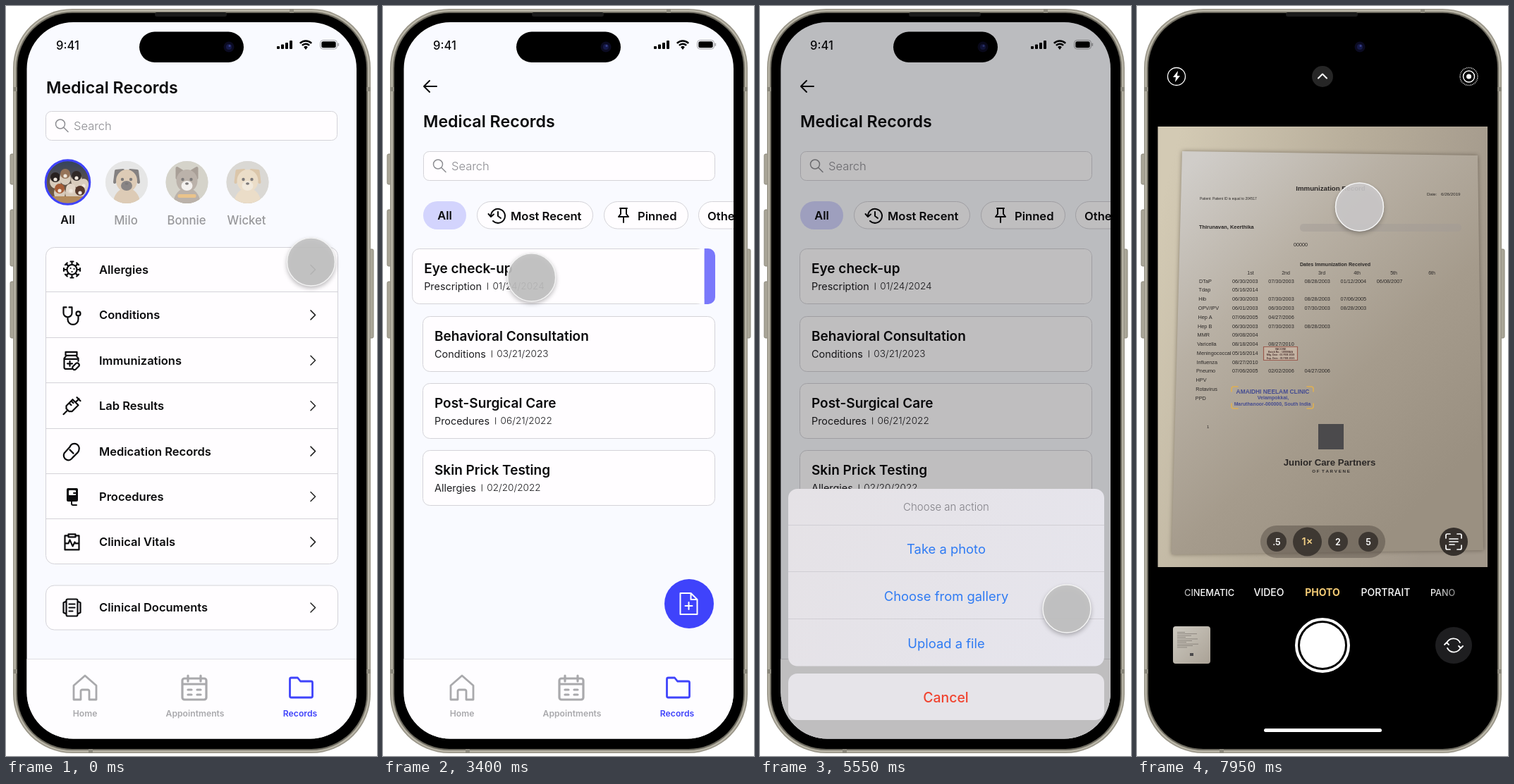
Write an HTML page with a canvas that moves like this. It is 526x1064 px and loops after 8000 ms.

```html
<!DOCTYPE html>
<html lang="en">
<head>
<meta charset="utf-8">
<title>Pet records app</title>
<style>
html, body { margin: 0; width: 100%; height: 100%; overflow: hidden; background: #fff; }
canvas { display: block; width: 526px; height: 1064px; }
</style>
</head>
<body>
<canvas></canvas>
<script>
const W = 526, H = 1064, LOOP = 8000, dpr = window.devicePixelRatio || 1;
const BLUE = '#3f43fb', INK = '#0b0b0d', GRAY = '#a9a9ac', LINE = '#d4d3d8', BG = '#f9faff', CARD = '#fffdff';

function prepare(canvas) {
  canvas.width = W * dpr;
  canvas.height = H * dpr;
  const ctx = canvas.getContext('2d');
  ctx.scale(dpr, dpr);
  return ctx;
}
let g = prepare(document.querySelector('canvas'));
const layer = prepare(document.createElement('canvas'));

// ---- drawing helpers ----
function paint(fill, stroke, lw = 1) {
  if (fill) { g.fillStyle = fill; g.fill(); }
  if (stroke) { g.strokeStyle = stroke; g.lineWidth = lw; g.stroke(); }
}
function box(x, y, w, h, r, fill, stroke, lw) {
  g.beginPath();
  g.roundRect(x, y, w, h, r);
  paint(fill, stroke, lw);
}
function disc(x, y, r, fill, stroke, lw, ry = r) {
  g.beginPath();
  g.ellipse(x, y, r, ry, 0, 0, 7);
  paint(fill, stroke, lw);
}
// y is the middle of the capital letters
function text(s, x, y, size, weight = 400, color = INK, align = 'left', font = 'Inter') {
  g.font = `${weight} ${size}px ${font}, sans-serif`;
  g.textAlign = align;
  g.fillStyle = color;
  g.fillText(s, x, y + size * 0.363);
  return g.measureText(s).width;
}
function icon(d, x, y, color = INK, lw = 2, fill) {
  const p = new Path2D(d);
  g.save();
  g.translate(x, y);
  g.lineCap = g.lineJoin = 'round';
  if (fill) { g.fillStyle = fill; g.fill(p); }
  if (lw) { g.strokeStyle = color; g.lineWidth = lw; g.stroke(p); }
  g.restore();
}
function clipped(shape, draw) {
  g.save();
  g.beginPath();
  shape();
  g.clip();
  draw();
  g.restore();
}
function gradient(x0, y0, x1, y1, ...stops) {
  const gr = g.createLinearGradient(x0, y0, x1, y1);
  stops.forEach((s, i) => gr.addColorStop(i / (stops.length - 1), s));
  return gr;
}
function fadeIn(draw, alpha) {
  const main = g;
  g = layer;
  g.clearRect(0, 0, W, H);
  draw();
  g = main;
  g.globalAlpha = alpha;
  g.drawImage(layer.canvas, 0, 0, W, H);
  g.globalAlpha = 1;
}

// ---- time ----
const ease = t => t < 0.5 ? 4 * t ** 3 : 1 - 4 * (1 - t) ** 3;
const ramp = (t, a, b) => Math.min(1, Math.max(0, (t - a) / (b - a)));
const eased = (t, a, b) => ease(ramp(t, a, b));

// cursor moves: from, to, x, y
const moves = [
  [0, 450, 389, 374], [800, 1100, 389, 385], [1500, 2500, 39.5, 384], [2500, 3700, 222, 385],
  [3800, 4495, 435, 855], [5700, 6100, 366, 756], [7050, 7920, 315.5, 285]
];
function cursor(t) {
  let x = 432.5, y = 363;
  for (const [a, b, nx, ny] of moves) {
    const p = eased(t, a, b);
    x += (nx - x) * p;
    y += (ny - y) * p;
  }
  g.save();
  g.shadowColor = 'rgba(0,0,0,.3)';
  g.shadowBlur = 6 * dpr;
  g.shadowOffsetY = 3 * dpr;
  disc(x, y, 34.5, t >= 7950 ? 'rgba(208,205,207,.88)' : 'rgba(195,195,195,.9)');
  g.restore();
  disc(x, y, 34, null, '#f4f4f4', 1.5);
}

// ---- phone ----
function phone() {
  g.fillStyle = '#fff';
  g.fillRect(0, 0, W, H);
  for (const [x, y, h] of [[6, 210, 43], [6, 289, 80], [6, 391, 80], [514, 345, 126]])
    box(x, y, 7, h, 2, '#aaa698', '#8a877a');
  box(10, 4, 507, 1056, 84, '#989487');
  box(11.5, 5.5, 504, 1053, 82.5, '#b9b5a7');
  box(14, 8, 499, 1048, 80, '#6f6c61');
  g.fillStyle = '#8b887c';
  for (const y of [115, 941]) { g.fillRect(10, y, 6, 6); g.fillRect(511, y, 6, 6); }
  g.fillRect(402, 4, 6, 6);
  g.fillRect(117, 1054, 6, 6);
  box(16, 10, 495, 1044, 78, '#000');
  box(211, 9, 102, 6, 3, '#1b1b1b');
}
function lens() {
  disc(316, 58, 7.5, '#0b0b22');
  disc(316, 58, 4, '#161a4a');
  disc(317, 56.5, 1.5, '#39418c');
}
function statusBar() {
  text('9:41', 71, 55.5, 16.6, 500);
  [4, 6.5, 9, 12].forEach((h, i) => box(384 + i * 6, 61 - h, 4, h, 1, '#000'));
  for (const r of [11.5, 7.2]) {
    g.beginPath();
    g.arc(425, 61, r, -2.36, -0.78);
    paint(null, '#000', 2.6);
  }
  g.beginPath();
  g.moveTo(425, 62);
  g.arc(425, 61, 4, -2.36, -0.78);
  paint('#000');
  box(445.5, 48.5, 24, 12.5, 4, null, '#a5a5a8');
  box(447.3, 50.3, 20.4, 9, 2.5, '#000');
  box(470.5, 52.5, 1.6, 4.5, 1, '#a5a5a8');
  box(189, 36.5, 148, 43.5, 21.7, '#000');
  lens();
}
function page() {
  g.fillStyle = BG;
  g.fillRect(29, 23, 469, 1018);
  statusBar();
}
const FOLDER = 'M-16 -12a2 2 0 0 1 2 -2h9l4 5h15a2 2 0 0 1 2 2v19a2 2 0 0 1 -2 2h-28a2 2 0 0 1 -2 -2z';
function tabs() {
  g.fillStyle = '#fefdff';
  g.fillRect(29, 927, 469, 114);
  g.fillStyle = '#dfdfe4';
  g.fillRect(29, 926, 469, 1);
  icon('M-16 -3L0 -17L16 -3V17H6V5a2 2 0 0 0 -2 -2h-8a2 2 0 0 0 -2 2V17H-16z', 112, 967, GRAY, 2.8);
  icon('M-14 -13h28a3 3 0 0 1 3 3v24a3 3 0 0 1 -3 3h-28a3 3 0 0 1 -3 -3v-24a3 3 0 0 1 3 -3zM-9 -17v8M9 -17v8M-17 -5h34M-9 3h5M4 3h5M-9 10h5M4 10h5', 267, 967, GRAY, 3.2);
  icon(FOLDER, 418.5, 967, BLUE, 2.8);
  text('Home', 112, 1004, 12.2, 600, GRAY, 'center');
  text('Appointments', 268, 1004, 12.2, 600, GRAY, 'center');
  text('Records', 417, 1004, 12.2, 600, BLUE, 'center');
}
function search(x, y) {
  box(x + .5, y + .5, 413, 41, 8, CARD, LINE);
  icon('M6.5 0a6.5 6.5 0 1 1 -13 0a6.5 6.5 0 1 1 13 0M5 5l6 6', x + 21, y + 18.5, '#8e8e93', 1.5);
  text('Search', x + 40, y + 21, 16.5, 300, '#8b8b90');
}

// ---- category menu ----
let virus = 'M7 0a7 7 0 1 1 -14 0a7 7 0 1 1 14 0M-2 -2h.1M3 -1h.1M0 3h.1';
for (let i = 0; i < 8; i++) {
  const c = Math.cos(i * Math.PI / 4), s = Math.sin(i * Math.PI / 4);
  virus += `M${7 * c} ${7 * s}L${11.5 * c} ${11.5 * s}M${11.5 * c - 2 * s} ${11.5 * s + 2 * c}L${11.5 * c + 2 * s} ${11.5 * s - 2 * c}`;
}
const rows = [
  ['Allergies', virus],
  ['Conditions', 'M-8 -11h-4v8a6 6 0 0 0 12 0v-8h-4M-6 3v3a7 7 0 0 0 15 0v-5M12 -2a3 3 0 1 1 -6 0a3 3 0 1 1 6 0'],
  ['Immunizations', 'M-9 -12h16v5h-16zM-8 -7l-3 4v13a2 2 0 0 0 2 2h9M6 -7l3 4v4M-11 -2h18M-3 1v7M-6.5 4.5h7M1 9l5 -5a3 3 0 0 1 4 4l-5 5a3 3 0 0 1 -4 -4'],
  ['Lab Results', 'M-12 12l6 -6M-6 6l-2 -2v-4l9 -9l8 8l-9 9h-4zM5 -5l5 -5M7 -12l5 5M-1 -7l3 3M-4 -4l3 3'],
  ['Medication Records', 'M-11 3l8 -9a6.5 6.5 0 0 1 13 4q0 2 -2 4l-7 7a6.5 6.5 0 0 1 -12 -6zM-3 -2l5 5'],
  ['Procedures', ''],
  ['Clinical Vitals', 'M-5 -9h-5v20h20v-20h-5M-5 -11h10v4h-10zM-9 2h4l2 -5l4 9l3 -6l1 2h4']
];
const DOCS = 'M-6 -12h12a2 2 0 0 1 2 2v20a2 2 0 0 1 -2 2h-12a2 2 0 0 1 -2 -2v-20a2 2 0 0 1 2 -2zM-4 -5h8M-4 0h8M-4 5h5M-8 -9l-4 2v14l4 2M8 -9l4 2v14l-4 2';
function row(label, d, y) {
  if (d) icon(d, 93.5, y, INK, 2.2);
  else {
    box(86, y - 12, 16, 19, 2, INK);
    box(89, y - 9, 10, 7, 1, '#fff');
    icon('M93 7v3a2 2 0 0 0 2 2h5M96 -5h3', 0, y, INK, 2);
  }
  text(label, 132, y, 16.5, 600);
  icon('M-3 -6.5l6.5 6.5l-6.5 6.5', 435, y, '#222', 1.5);
}
const FLOPPY = 'M-15 -14l10 -1l-12 17zM15 -14l-10 -1l12 17z', UPRIGHT = 'M-14 -18l10 6l-10 8zM14 -18l-10 6l10 8z';
function pet(x, bg, fur, ear, muzzle, ears, collar) {
  clipped(() => g.arc(x, 250, 30, 0, 7), () => {
    disc(x, 250, 31, bg);
    disc(x, 280, 19, fur, null, 0, 22);
    if (collar) box(x - 13, 267, 26, 5, 2, collar);
    icon(ears, x, 248, ear, 4, ear);
    disc(x, 248, 15, fur, null, 0, 16);
    disc(x, 255, 8, muzzle, null, 0, 7);
    for (const s of [-6, 6]) disc(x + s, 246, 2.2, '#221d1a');
    disc(x, 252, 2.5, '#221d1a', null, 0, 1.8);
    disc(x, 250, 31, 'rgba(249,250,255,.42)');
  });
}
function pack() {
  clipped(() => g.arc(87.5, 250, 31, 0, 7), () => {
    g.fillStyle = gradient(0, 219, 0, 281, '#33435f', '#5d5148', '#84623f');
    g.fillRect(56, 218, 64, 64);
    for (const [x, y, c] of [[70, 243, '#28211f'], [84, 238, '#96745a'], [100, 241, '#302927'], [110, 252, '#d9cdbf'], [76, 259, '#a55c36'], [92, 259, '#e2d6c8'], [105, 262, '#54372a']]) {
      disc(x, y + 6, 8, '#d8cbbb', null, 0, 10);
      disc(x, y, 7, c);
      disc(x, y + 3, 2.6, '#efe7dd');
    }
    box(60, 270, 55, 14, 4, '#b28a5c');
  });
  disc(87.5, 250, 31.3, null, BLUE, 3);
}
function menu() {
  page();
  text('Medical Records', 57, 116, 23.2, 600);
  search(56, 149);
  pack();
  pet(171, '#d7d7d3', '#c7a980', '#2e2926', '#37302c', FLOPPY);
  pet(256.5, '#b9b6a4', '#8d7e6c', '#6d5d4c', '#efe9e2', UPRIGHT, '#dd9a37');
  pet(342.5, '#c2beb4', '#dfc7a0', '#c49f6c', '#eadcc2', FLOPPY);
  text('All', 87.5, 303, 16.2, 600, INK, 'center');
  ['Milo', 'Bonnie', 'Wicket'].forEach((s, i) => text(s, [170, 256, 341][i], 304, 16.7, 500, '#98989b', 'center'));
  box(56.5, 342.5, 414, 449, 12, CARD, LINE);
  rows.forEach(([s, d], i) => {
    const y = 374 + i * 64.4;
    if (i) { g.fillStyle = LINE; g.fillRect(57, Math.round(y - 33), 413, 1); }
    row(s, d, y);
  });
  box(56.5, 822, 414, 63, 12, CARD, LINE);
  row('Clinical Documents', DOCS, 853.5);
  tabs();
}

// ---- record list ----
const records = [
  ['Eye check-up', 'Prescription', '01/24/2024'], ['Behavioral Consultation', 'Conditions', '03/21/2023'],
  ['Post-Surgical Care', 'Procedures', '06/21/2022'], ['Skin Prick Testing', 'Allergies', '02/20/2022']
];
function record([title, kind, date], x, y) {
  box(x + .5, y + .5, 414, 78, 10, CARD, LINE);
  text(title, x + 17, y + 28, 19, 600);
  const w = text(kind, x + 17, y + 53.5, 14.4, 400, '#1d1d20');
  g.fillStyle = '#333';
  g.fillRect(x + 25 + w, y + 48.5, 1, 10);
  text(date, x + 32.5 + w, y + 53.5, 13.6, 300, '#1d1d20');
}
function chip(x, w, label, tx) {
  box(x + .5, 277.5, w, 38.5, 19.5, CARD, LINE);
  text(label, tx, 297.5, 16.6, 600);
}
function list(swipe) {
  page();
  icon('M9 0h-18M-1 -8l-8 8l8 8', 67, 114, INK, 2);
  text('Medical Records', 57, 164, 23.2, 600);
  search(57, 206);
  box(57, 277, 61, 40, 20, '#d3d4fd');
  text('All', 87.5, 297.5, 16.4, 600, INK, 'center');
  chip(133, 164, 'Most Recent', 181);
  icon('M-8.5 1a10 10 0 1 1 3 7M-12 -2l3.5 4l4 -3.5M1.5 -5v6l4 3', 161.5, 297, INK, 2);
  chip(313, 119, 'Pinned', 361);
  icon('M-5 -10h10M-4 -10v8l-3 4h14l-3 -4v-8M0 2v8', 341, 297, INK, 2);
  chip(447, 110, 'Others', 460);
  const dx = -240 * swipe;
  clipped(() => g.roundRect(0, 344, 471, 79, [0, 10, 10, 0]), () => {
    record(records[0], 56 + dx, 344);
    if (!swipe) return;
    const x = 470.5 + dx;
    g.fillStyle = CARD;
    g.fillRect(x - 12, 345, 12, 77);
    ['#7a78fb', '#2f93fb', '#fb3a30'].forEach((c, i) => {
      g.fillStyle = c;
      g.fillRect(x + [0, 81, 161][i], 344, 82, 79);
    });
    icon('M-12 -9a2 2 0 0 1 2 -2h6l3 4h11a2 2 0 0 1 2 2v13a2 2 0 0 1 -2 2h-20a2 2 0 0 1 -2 -2z', x + 38, 384, '#fff', 1.8);
    icon('M-10 0v10a2 2 0 0 0 2 2h16a2 2 0 0 0 2 -2v-10M0 5v-18M-6 -7l6 -6l6 6', x + 121.5, 384, '#fff', 2);
    icon('M-11 -8h22M-8 -8l1 18a2 2 0 0 0 2 2h10a2 2 0 0 0 2 -2l1 -18M-4 -8v-4h8v4M-3 -3v10M3 -3v10', x + 201, 384, '#fff', 2);
  });
  for (let i = 1; i < 4; i++) record(records[i], 56, Math.round(344.4 + i * 95.3));
  disc(434, 848, 35, BLUE);
  icon('M-12 -15h15l9 9v21h-24zM3 -15v9h9M0 -2v10M-5 3h10', 433.5, 848, '#fff', 2);
  tabs();
}
function sheet(p) {
  g.fillStyle = `rgba(0,0,0,${0.25 * p})`;
  g.fillRect(29, 23, 469, 1018);
  g.save();
  g.translate(0, 380 * (1 - p));
  box(40, 685, 448, 251.5, 13, gradient(40, 685, 488, 936, '#e5e2e6', '#e6e5ed'));
  g.fillStyle = '#d0ced4';
  for (const y of [736, 802, 869]) g.fillRect(40, y, 448, 1);
  text('Choose an action', 264, 710.5, 15, 300, '#828187', 'center');
  ['Take a photo', 'Choose from gallery', 'Upload a file'].forEach((s, i) =>
    text(s, 264, 770 + i * 67, 18.4, 400, '#2f7bf3', 'center'));
  box(40, 947, 448, 66, 13, '#e6e4e9');
  text('Cancel', 263.5, 981, 19.4, 500, '#f0432f', 'center');
  g.restore();
}

// ---- new record form ----
function scan() {
  clipped(() => g.roundRect(56, 206, 154, 153, 12), () => {
    g.fillStyle = gradient(56, 206, 210, 359, '#e9eef1', '#d6e0e8', '#bfd0de');
    g.fillRect(56, 206, 154, 153);
    const dark = '#66727f';
    box(83, 208, 121, 11, 0, dark);
    text('CANINE MEDICAL RECORD', 143.5, 213.5, 8.3, 700, '#eef2f5', 'center');
    g.fillStyle = '#9aa8b4';
    for (let y = 226; y < 358; y += 7.5) g.fillRect(59, y, 147, .7);
    for (let i = 0; i < 8; i++) g.fillRect(72 + i * 9, 262, .7, 36);
    for (const x of [59, 110, 158, 206]) g.fillRect(x, 222, .7, 134);
    for (const [x, y, w, h] of [[59, 261, 6, 37], [137, 261, 7, 37], [58, 299, 149, 6], [58, 330, 149, 6]]) box(x, y, w, h, 0, dark);
    [['PROBLEM LIST', 82, 302], ['MEDICATIONS', 131, 302], ['ALLERGIES', 182, 302], ['DATE', 69, 333], ['TREATMENT NOTES', 124, 333], ['MEDIC. SIGN', 188, 333]]
      .forEach(([s, x, y]) => text(s, x, y, 4, 700, '#eef2f5', 'center'));
    for (let i = 0; i < 34; i++) {
      const x = 62 + (i * 47) % 124, y = 224 + Math.floor(i / 2) * 7.6;
      icon('M0 0q2 -4 3 0t3 0t3 -1t4 1t4 -1', x, y, '#77838f', .7);
    }
  });
}
function form() {
  page();
  icon('M-7 -7l14 14M7 -7l-14 14', 69.5, 114, INK, 2);
  text('Add Record', 56, 164, 22.9, 600);
  scan();
  box(228.5, 206.5, 152.5, 151.5, 10, CARD, LINE);
  icon('M-9.5 0h19M0 -9.5v19', 305.5, 276, INK, 2.2);
  text('Add image', 305.5, 311, 16.2, 600, INK, 'center');
  text('File name*', 56, 400.5, 18.2, 600);
  box(56.5, 424.5, 414, 51.5, 10, CARD, LINE);
  text('File Name', 67, 451, 16.5, 300, '#8f8f94');
  text('Date of Record*', 56, 518.5, 18.2, 600);
  box(56.5, 542.5, 414, 51.5, 10, CARD, LINE);
  text('MM/DD/YYYY', 75, 569.5, 13.6, 300, '#8f8f94');
  icon('M-9 -9h18a2 2 0 0 1 2 2v16a2 2 0 0 1 -2 2h-18a2 2 0 0 1 -2 -2v-16a2 2 0 0 1 2 -2zM-11 -2h22M-6 -12v5M6 -12v5', 429, 569, INK, 2.2);
  text('Additional Notes', 56, 637, 18.2, 600);
  box(56.5, 660.5, 414, 96.5, 10, CARD, LINE);
  box(56, 923, 415, 56.5, 10, BLUE);
  text('Save Record', 263.5, 952, 18.6, 600, '#fff', 'center');
}

// ---- camera ----
const doses = `DTaP 06/30/2003 07/30/2003 08/28/2003 01/12/2004 06/08/2007
Tdap 05/16/2014
Hib 06/30/2003 07/30/2003 08/28/2003 07/06/2005
OPV/IPV 06/01/2003 06/30/2003 07/30/2003 08/28/2003
Hep_A 07/06/2005 04/27/2006
Hep_B 06/30/2003 07/30/2003 08/28/2003
MMR 09/08/2004
Varicella 08/18/2004 08/27/2010
Meningococcal 05/16/2014
Influenza 08/27/2010
Pneumo 07/06/2005 02/02/2006 04/27/2006
HPV
Rotavirus
PPD`.split('\n').map(l => l.split(' '));
const print = (s, x, y, size, weight = 400, align = 'left', color = '#2b2827') =>
  text(s, x, y, size, weight, color, align, 'Liberation Sans');

function paper() {
  g.fillStyle = gradient(29, 300, 497, 420, '#d3cab4', '#b8ae9b', '#a1978a');
  g.fillRect(29, 171, 468, 625);
  g.save();
  g.shadowColor = 'rgba(40,30,20,.45)';
  g.shadowBlur = 6 * dpr;
  icon('M64 206L483 212L491 772L49 778z', 0, 0, '', 0, gradient(70, 230, 470, 640, '#d0cdc9', '#b8b0a4', '#a59b8c', '#9a9081'));
  g.restore();
  print('Immunization Record', 274.5, 258, 9.7, 700, 'center');
  print('Patient: Patient ID is equal to 204517', 89, 273.5, 4.9);
  print('Date:', 411, 267, 6);
  print('6/26/2019', 431, 267, 6.2);
  print('Thirunavan, Keerthika', 88, 313.5, 7.4, 700);
  box(231, 309, 229, 11, 5, 'rgba(160,154,148,.45)');
  print('00000', 222, 338, 7.2);
  print('Dates Immunization Received', 281, 366, 7.1, 700, 'center');
  ['1st', '2nd', '3rd', '4th', '5th', '6th'].forEach((s, i) => print(s, [161, 211, 262, 312, 364, 418][i], 378, 7, 400, 'center'));
  doses.forEach(([name, ...dates], i) => {
    const y = 390 + i * 12.78;
    print(name.replace('_', ' '), 88 - i * .4, y, 7.3);
    dates.forEach((d, j) => print(d, 135 + j * 51.2, y, 7.3));
  });
  box(179.5, 483.5, 48, 19, 0, '#c4b3a3', '#9a5b4e', 1.2);
  ['VACCINE', 'Batch No. : U0000AA', 'Mfg. Date : 01 FEB 2019', 'Exp. Date : 01 FEB 2021'].forEach((s, i) => print(s, 203.5, 487 + i * 4.1, 3.5, 700, 'center', '#4b3230'));
  const stamp = '#454c92';
  print('AMAIDHI NEELAM CLINIC', 192.5, 547, 8.4, 700, 'center', stamp);
  print('Velampokkai,', 193, 555.5, 7, 700, 'center', stamp);
  print('Maruthanoor-000000, South India', 192, 564, 6.9, 700, 'center', stamp);
  icon('M134 547v-4q0 -3 3 -3h6M241 540h6q3 0 3 3v4M250 564v4q0 3 -3 3h-6M143 571h-6q-3 0 -3 -3v-4', 0, 0, '#dfb052', 1.6);
  print('1', 99, 597, 6);
  box(257, 593, 36, 36, 0, '#4b4a4c');
  print('Junior Care Partners', 273, 647, 13.2, 700, 'center');
  print('O F  T A R V E N E', 275, 660, 6.2, 700, 'center');
}
function camera() {
  g.fillStyle = '#000';
  g.fillRect(29, 23, 469, 1018);
  lens();
  disc(56, 100, 12.5, null, '#fff', 1.3);
  icon('M2 -8l-7 9h4l-1 7l7 -9h-4z', 56, 100, '', 0, '#fff');
  disc(263, 100, 15, '#262626');
  icon('M-6 3l6 -6l6 6', 263, 99.5, '#fff', 2);
  g.setLineDash([1, 1.3]);
  disc(470.5, 100, 12.5, null, '#fff', 1.5);
  g.setLineDash([]);
  disc(470.5, 100, 8, null, '#fff', 1.5);
  disc(470.5, 100, 3.5, '#fff');
  paper();
  box(175, 737, 177, 46, 23, 'rgba(55,48,42,.35)');
  [['.5', 198, 14], ['1×', 241.5, 20.5], ['2', 285, 14], ['5', 328, 14]].forEach(([s, x, r], i) => {
    disc(x, 760, r, 'rgba(45,40,36,.78)');
    text(s, x, 760, i === 1 ? 14.5 : 12.5, 600, i === 1 ? '#f2cf85' : '#fff', 'center');
  });
  disc(449, 760, 20, 'rgba(40,36,32,.88)');
  icon('M-11 -5v-4q0 -2 2 -2h4M5 -11h4q2 0 2 2v4M11 5v4q0 2 -2 2h-4M-5 11h-4q-2 0 -2 -2v-4M-6 -4h12M-6 0h12M-6 4h7', 449, 760, '#fff', 1.7);
  text('CINEMATIC', 67, 832, 12.8, 500, gradient(48, 0, 90, 0, '#555', '#fff'));
  text('VIDEO', 187, 832, 14, 500, '#fff', 'center');
  text('PHOTO', 263, 832, 14, 700, '#f3cb75', 'center');
  text('PORTRAIT', 352.5, 832, 14, 500, '#fff', 'center');
  text('PANO', 416, 832, 12.6, 500, gradient(416, 0, 456, 0, '#fff', '#777'));
  box(51, 880, 53, 53, 4, gradient(51, 880, 104, 933, '#cdc9c0', '#aaa296'));
  g.fillStyle = '#77716b';
  for (let i = 0; i < 10; i++) g.fillRect(57, 888 + i * 2.4, 11 + (i * 17) % 25, .7);
  box(75, 918, 5, 4, 0, '#4b4a4c');
  disc(263, 907, 37, null, '#fff', 4);
  disc(263, 907, 32, '#fff');
  disc(449, 907, 26, '#1e1e20');
  icon('M-10 -3a10.5 10.5 0 0 1 19 -1M10 3a10.5 10.5 0 0 1 -19 1M-13 -1l3 -3l3 3M13 1l-3 3l-3 -3', 449, 907, '#fff', 1.8);
  box(180, 1025, 167, 5, 2.5, '#fff');
}

// ---- loop ----
function screen(t) {
  if (t >= 7950) return camera();
  if (t >= 6600) return form();
  if (t < 1100) menu();
  const toList = ramp(t, 800, 1100), toForm = ramp(t, 6300, 6600);
  const swipe = eased(t, 1500, 2500) - eased(t, 2500, 3700);
  if (toList === 1) list(swipe);
  else if (toList > 0) fadeIn(() => list(0), toList);
  if (t > 4650) sheet(eased(t, 4650, 5450));
  if (toForm > 0) fadeIn(form, toForm);
}
function frame(now) {
  const t = now % LOOP;
  phone();
  clipped(() => g.roundRect(29.5, 23, 467.5, 1016.5, 66), () => screen(t));
  cursor(t);
  requestAnimationFrame(frame);
}
requestAnimationFrame(frame);
</script>
</body>
</html>
```
